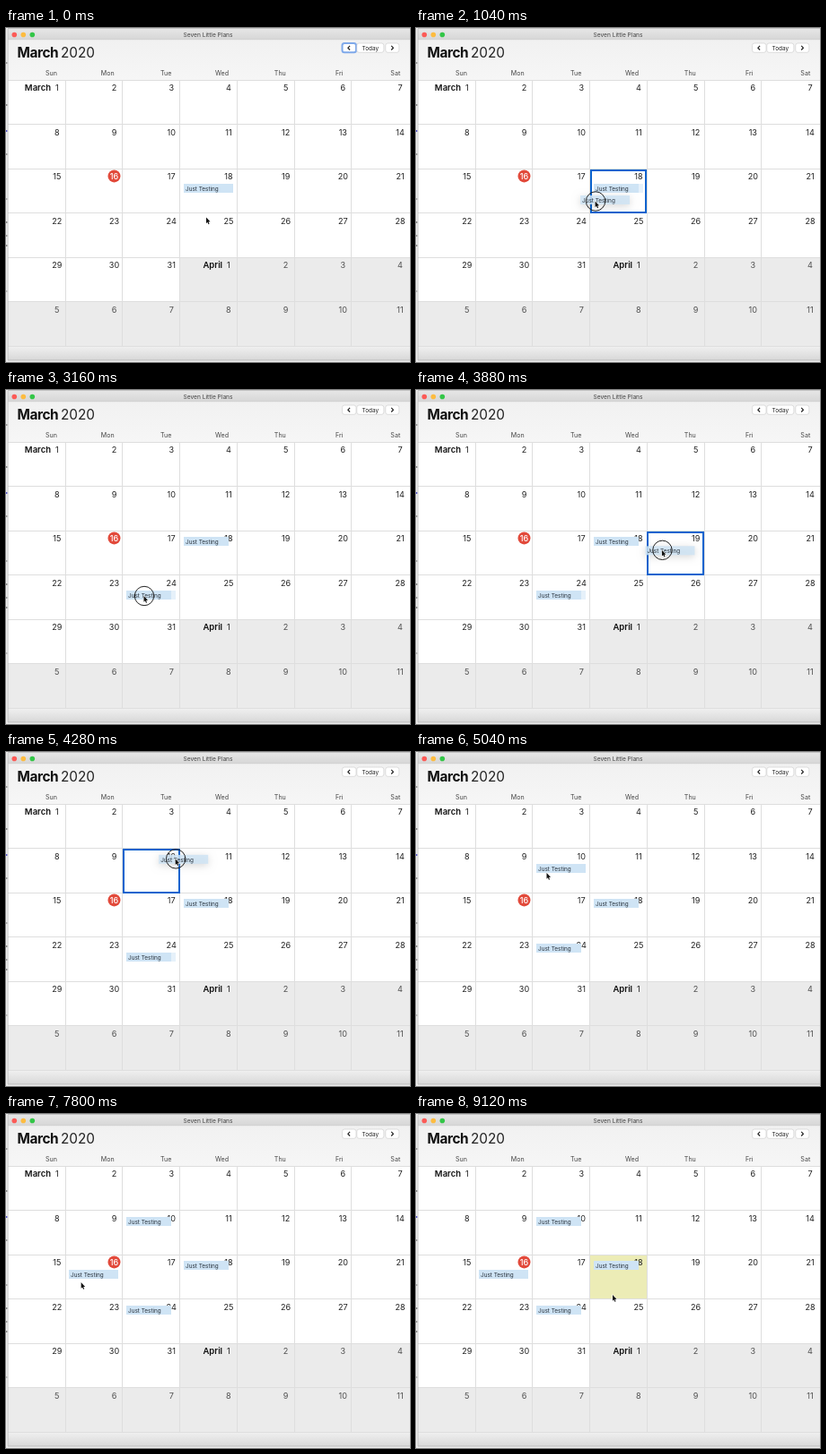
Recreate the animation shown at these times as an HTML page with a canvas. Size 450 by 373 pixels, loop 9.16 s.

```html
<!DOCTYPE html>
<html lang="en">
<head>
<meta charset="utf-8">
<title>Calendar</title>
<style>
html, body { margin: 0; width: 100%; height: 100%; overflow: hidden; background: #ededed; }
canvas { display: block; width: 450px; height: 373px; }
</style>
</head>
<body>
<canvas id="stage"></canvas>
<script>
const LOOP = 9160, LEFT = 2.5, TOP = 58.5, CW = 63.7, RH = 49.5;
const FONT = 'Inter, "Open Sans", sans-serif';
const canvas = document.getElementById('stage');
const ratio = window.devicePixelRatio || 1;
canvas.width = 450 * ratio;
canvas.height = 373 * ratio;
const c = canvas.getContext('2d');
c.scale(ratio, ratio);

// Pointer stops: time, x, y
const stops = [
  [0, 223.5, 211.5], [400, 215, 181], [760, 215, 181], [1520, 150.5, 235.5],
  [1600, 151, 237], [2800, 151, 237], [3000, 154, 230], [3240, 154, 230],
  [3680, 216, 222], [3880, 274.5, 179], [4380, 168, 111], [4600, 146, 135],
  [5480, 146, 135], [5720, 155, 132.5], [6240, 155, 132.5], [6560, 38.5, 171],
  [6800, 46, 212], [7120, 82.5, 189], [7760, 82.5, 189], [8120, 150, 162],
  [8480, 220, 186], [8600, 220, 186], [8920, 219.5, 202], [LOOP, 219.5, 202]
];

// Each drag copies an event from one day cell to another
const drags = [
  { press: 720, start: 760, release: 1640, settle: 2080, from: 17, to: 23, dx: 17, dy: 6.5 },
  { press: 3120, start: 3240, release: 4680, settle: 5040, from: 23, to: 9, dx: 19, dy: 4.5 },
  { press: 6120, start: 6280, release: 7200, settle: 7560, from: 9, to: 15, dx: 20, dy: 10 }
];
const CLICK = 9000, SELECT = 9040, CLICK_END = 9080;

const cellX = i => LEFT + i % 7 * CW;
const cellY = i => TOP + Math.floor(i / 7) * RH;

function rect(x, y, w, h, fill) {
  c.fillStyle = fill;
  c.fillRect(x, y, w, h);
}

function shade(y, h, from, to) {
  const fill = c.createLinearGradient(0, y, 0, y + h);
  fill.addColorStop(0, from);
  fill.addColorStop(1, to);
  rect(2, y, 448, h, fill);
}

function disc(x, y, r, fill) {
  c.fillStyle = fill;
  c.beginPath();
  c.arc(x, y, r, 0, 7);
  c.fill();
}

function text(s, x, y, size, align = 'left', weight = 400, fill = '#222') {
  c.font = `${weight} ${size}px ${FONT}`;
  c.textAlign = align;
  c.fillStyle = fill;
  c.fillText(s, x, y);
}

// Hermite curve through the stops; a stop beside a pause has zero speed
function slope(k, axis) {
  const a = stops[k - 1], b = stops[k], d = stops[k + 1];
  if (!a || !d) return 0;
  const still = (p, q) => p[1] === q[1] && p[2] === q[2];
  return still(a, b) || still(b, d) ? 0 : (d[axis] - a[axis]) / (d[0] - a[0]);
}

function pointer(t) {
  const k = stops.findIndex(s => s[0] > t) - 1;
  const a = stops[k], b = stops[k + 1], span = b[0] - a[0], u = (t - a[0]) / span;
  const at = axis => {
    const e = u * u * (3 - 2 * u);
    return a[axis] + (b[axis] - a[axis]) * e + span * u * (1 - u) *
      ((1 - u) * slope(k, axis) - u * slope(k + 1, axis));
  };
  return [at(1), at(2)];
}

function button(x, w, focus) {
  c.beginPath();
  c.roundRect(x, 17, w, 10.3, 2.5);
  c.fillStyle = '#fff';
  c.fill();
  c.lineWidth = focus ? 2 : 0.6;
  c.strokeStyle = focus ? '#7fa9ea' : '#c9c9c9';
  c.stroke();
}

function chevron(x, dir) {
  c.beginPath();
  c.moveTo(x - dir * 1.1, 19.9);
  c.lineTo(x + dir * 1.1, 22.2);
  c.lineTo(x - dir * 1.1, 24.5);
  c.lineWidth = 1.2;
  c.strokeStyle = '#222';
  c.stroke();
}

function windowFrame(t) {
  rect(0, 0, 450, 373, '#ededed');
  [[38, '#999'], [85, '#888'], [114, '#5555cc'], [140, '#999'], [190, '#aaa'],
    [216, '#888'], [231, '#999'], [242, '#888'], [293, '#bbb']]
    .forEach(([y, fill]) => rect(0, y, 1.5, 2, fill));
  shade(1, 12, '#e6e6e6', '#d6d6d6');
  shade(13, 46, '#f1f1f1', '#f6f6f6');
  rect(2, 0, 448, 1, '#c4c4c4');
  rect(2, 12.5, 448, 0.7, '#cfcfcf');
  ['#fc5b57', '#fdbc40', '#34c648'].forEach((fill, i) => disc(9.3 + i * 10, 7.5, 2.8, fill));
  text('Seven Little Plans', 225, 10, 6.6, 'center', 400, '#444');
  c.letterSpacing = '-0.4px';
  text('March', 12.5, 32.6, 15.4, 'left', 700, '#111');
  c.letterSpacing = '0px';
  text('2020', 61, 32.6, 15.3);
  button(374.5, 15.5, t < 720);
  button(390.8, 30, false);
  button(422.8, 15, false);
  chevron(382, -1);
  chevron(430.3, 1);
  text('Today', 405.8, 24.6, 6.4, 'center');
  'Sun Mon Tue Wed Thu Fri Sat'.split(' ')
    .forEach((day, i) => text(day, cellX(i) + 54.5, 53.3, 7.1, 'right', 400, '#444'));
}

// Pixel-aligned box of a day cell
function cellBox(i) {
  const x = Math.round(cellX(i)), y = Math.round(cellY(i));
  return [x, y, Math.round(cellX(i) + CW) - x, Math.round(cellY(i) + RH) - y];
}

function grid(t) {
  rect(2, 58, 448, 298, '#ebebeb');
  rect(2, 58, 448, 199, '#fff');
  rect(2, 256, 191, 50, '#fff');
  if (t >= SELECT) rect(...cellBox(17), '#ececb6');
  for (let i = 0; i < 7; i++) {
    rect(2, Math.round(TOP + i * RH) - 1, 448, 1, '#dedede');
    if (i) rect(Math.floor(cellX(i)), 58, 1, 298, '#dedede');
  }
  shade(356, 15, '#efefef', '#d8d8d8');
  rect(2, 370.5, 448, 1, '#bcbcbc');
  rect(1.7, 1, 0.8, 370, '#bdbdbd');
  for (let i = 0; i < 42; i++) {
    const x = cellX(i) + 54.3, y = cellY(i) + 11.8, today = i === 15;
    if (today) disc(x, y - 3.9, 7, '#e24a3b');
    const ink = today ? '#fff' : i > 31 ? '#505050' : '#222';
    text(i < 31 ? i + 1 : i - 30, x, y, 9.1, 'center', today ? 500 : 400, ink);
    if (i === 0 || i === 31) text(i ? 'April' : 'March', x - 6.8, y, 9.5, 'right', 600, '#111');
  }
}

function label(x, y) {
  text('Just Testing', x + 2, y + 7.8, 6.4, 'left', 400, '#29333d');
}

function event(cell, t) {
  const drag = drags.find(d => d.from === cell) || { press: Infinity, settle: Infinity };
  const raised = t >= drag.settle;
  const x = Math.round(cellX(cell)) + 4;
  const y = Math.floor(cellY(cell)) + (raised ? 7 : 17);
  rect(x, y, 50, 10, '#cfe4f5');
  if (!raised) rect(x + 50, y, 5, 10, t >= drag.press ? '#e6f1fa' : '#cfe4f5');
  label(x, y);
}

function dropTarget(px, py) {
  const i = Math.floor((px - LEFT) / CW) + 7 * Math.floor((py - TOP) / RH);
  const [x, y, w, h] = cellBox(i);
  c.lineWidth = 2;
  c.strokeStyle = '#0b63ce';
  c.strokeRect(x + 1, y + 1, w - 2, h - 2);
}

function ghost(x, y, alpha) {
  c.save();
  c.globalAlpha = alpha;
  c.shadowColor = 'rgba(0,0,0,.18)';
  c.shadowBlur = 8 * ratio;
  c.shadowOffsetY = 2 * ratio;
  rect(x, y, 55, 10, 'rgba(207,228,245,.85)');
  c.shadowColor = 'transparent';
  label(x, y);
  c.restore();
}

function arrow(x, y) {
  c.save();
  c.translate(x - 0.5, y);
  c.scale(0.85, 0.88);
  c.beginPath();
  [[0, 0], [0, 7.6], [1.7, 6.1], [2.9, 8.8], [4.2, 8.2], [3, 5.6], [5.3, 5.5]]
    .forEach(p => c.lineTo(...p));
  c.closePath();
  c.lineWidth = 1.2;
  c.lineJoin = 'round';
  c.strokeStyle = '#fff';
  c.stroke();
  c.fillStyle = '#111';
  c.fill();
  c.restore();
}

function draw(t) {
  windowFrame(t);
  grid(t);
  event(17, t);
  drags.forEach(d => t >= d.settle && event(d.to, t));
  const [x, y] = pointer(t);
  const drag = drags.find(d => t >= d.start && t < d.settle);
  if (drag) {
    dropTarget(x, y);
    const alpha = Math.min(1, 1 - (t - drag.release) / 200);
    if (alpha > 0) ghost(x - drag.dx, y - drag.dy, alpha);
  }
  const pressed = drags.some(d => t >= d.press && t < d.release) ||
    (t >= CLICK && t < CLICK_END);
  if (pressed) {
    c.beginPath();
    c.arc(x, y, 10.7, 0, 7);
    c.lineWidth = 1;
    c.strokeStyle = '#222';
    c.stroke();
  }
  arrow(x, y);
}

const begin = performance.now();
function tick() {
  draw((performance.now() - begin) % LOOP);
  requestAnimationFrame(tick);
}
tick();
</script>
</body>
</html>
```
